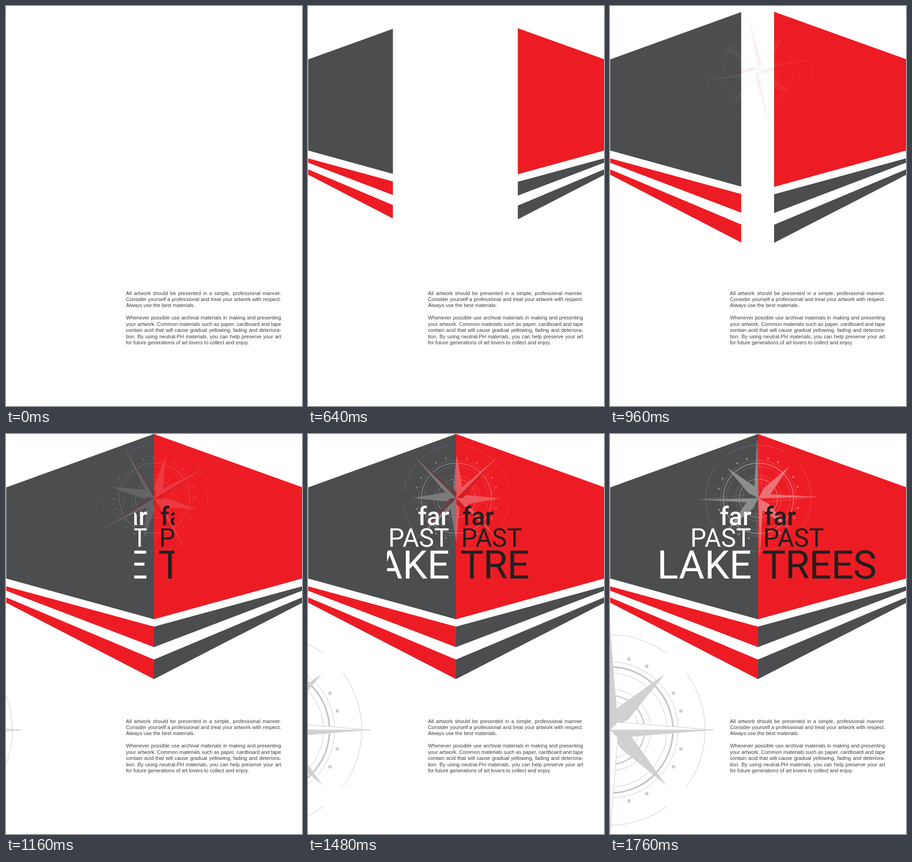
These frames come from a looping animation (644 px wide and 869 px high, 1800 ms). An HTML page:

```html
<!DOCTYPE html>
<html lang="en">
<head>
<meta charset="utf-8">
<title>Poster</title>
<style>
  html, body { margin: 0; width: 100%; height: 100%; overflow: hidden; background: #fff; }
  svg { display: block; width: 644px; height: 869px; }
  .title { font-family: Roboto, "Open Sans", sans-serif; }
  .title .small { font-size: 55px; font-weight: 500; }
  .title .mid { font-size: 55px; }
  .title .big { font-size: 86px; }
  .body { font: 11.13px "Liberation Sans", Arial, sans-serif; fill: #3b3b3c; }
</style>
</head>
<body>
<svg viewBox="0 0 644 869" xmlns="http://www.w3.org/2000/svg">
  <defs>
    <clipPath id="wipeLeft"><rect id="wipeL" y="0" height="869"/></clipPath>
    <clipPath id="wipeRight"><rect id="wipeR" y="0" height="869"/></clipPath>
    <clipPath id="typeLeft"><rect id="typeL" y="140" height="200"/></clipPath>
    <clipPath id="typeRight"><rect id="typeR" y="140" height="200"/></clipPath>
  </defs>
  <g clip-path="url(#wipeLeft)">
    <path fill="#4c4d4f" d="M.5 116L322 0V402.5L.5 314Z"/>
    <path fill="#ed1c24" d="M.5 331L322 418.5V463L.5 340.5ZM.5 355L322 490V532.5L.5 366.5Z"/>
  </g>
  <g clip-path="url(#wipeRight)">
    <path fill="#ed1c24" d="M644 115.5L322 0V402.5L644 314Z"/>
    <path fill="#4c4d4f" d="M644 331L322 418.5V463L644 340.5ZM644 355L322 490V532.5L644 367Z"/>
  </g>
  <g id="rose"></g>
  <g id="bigRose"></g>
  <g class="title">
    <g clip-path="url(#typeLeft)" fill="#fff" text-anchor="end">
      <text class="small" x="307.5" y="197.5">far</text>
      <text class="mid" x="307" y="245">PAST</text>
      <text class="big" x="308.5" y="314">LAKE</text>
    </g>
    <g clip-path="url(#typeRight)" fill="#231f20">
      <text class="small" x="336" y="197.5">far</text>
      <text class="mid" x="333.5" y="245">PAST</text>
      <text class="big" x="331" y="314" letter-spacing="-1">TREES</text>
    </g>
  </g>
  <g id="copy" class="body"></g>
</svg>
<script>
const LOOP = 1800, STEP = 40;
const $ = id => document.getElementById(id);
const set = (id, attrs) => {
  for (const key in attrs) $(id).setAttribute(key, attrs[key]);
};

const polar = (r, deg) => {
  const a = deg * Math.PI / 180;
  return `${(r * Math.sin(a)).toFixed(2)} ${(-r * Math.cos(a)).toFixed(2)}`;
};
const quarters = draw => [0, 90, 180, 270].map(draw).join('');

// Compass rose around the origin; the outer ring is open at the diagonals.
function compass(color, line, paper, shade) {
  const ring = ([r, w]) => `<circle r="${r}" stroke-width="${w}"/>`;
  const rings = [[148, 1], [137, 3.6], [124, 1], [89, 1], [75, 2.6], [62, 1]].map(ring).join('');
  const arcs = quarters(a =>
    `<path d="M${polar(207, a - 36.5)}A207 207 0 0 1 ${polar(207, a + 36.5)}"/>`);
  const dots = quarters(a => [15, 30, 60, 75].map(d => {
    const [x, y] = polar(159.5, a + d).split(' ');
    return `<circle cx="${x}" cy="${y}" r="4"/>`;
  }).join(''));
  const turned = d => quarters(a => `<path transform="rotate(${a})" d="${d}"/>`);
  const lightHalf = 'M0 -226L-17 -17L0 0Z';
  return `<g fill="none" stroke="${line}">${rings}${arcs}</g>
    <g fill="${color}">${dots}${turned('M120 -122L16 -48L0 0L40 -23Z')}</g>
    <g fill="${paper}" stroke="${line}" stroke-width="1">${turned(lightHalf)}</g>
    ${shade ? `<g id="shade" fill="${shade}">${turned(lightHalf)}</g>` : ''}
    <g fill="${color}">${turned('M0 -226L17 -17L0 0Z')}</g>`;
}
$('rose').innerHTML = compass('#e6e7e8', '#e6e7e8', 'none', '#a51e26');
$('bigRose').innerHTML = compass('#d1d1d1', '#c6c6c6', '#fff');

// Lines ending a paragraph stay ragged; the others fill the column.
const COLUMN = 337.5;
[
  'All artwork should be presented in a simple, professional manner.',
  'Consider yourself a professional and treat your artwork with respect.',
  'Always use the best materials.',
  '',
  'Whenever possible use archival materials in making and presenting',
  'your artwork. Common materials such as paper, cardboard and tape',
  'contain acid that will cause gradual yellowing, fading and deteriora-',
  'tion. By using neutral-PH materials, you can help preserve your art',
  'for future generations of art lovers to collect and enjoy.'
].forEach((words, i, lines) => {
  if (!words) return;
  const el = document.createElementNS('http://www.w3.org/2000/svg', 'text');
  el.setAttribute('x', 261);
  el.setAttribute('y', 627.6 + 13.43 * i);
  el.textContent = words;
  $('copy').append(el);
  if (lines[i + 1]) {
    const gaps = words.split(' ').length - 1;
    el.style.wordSpacing = (COLUMN - el.getComputedTextLength()) / gaps + 'px';
  }
});

const clamp = (v, lo, hi) => Math.min(hi, Math.max(lo, v));

function render(t) {
  const leftEdge = clamp(84 + 0.3148 * (t - 320), 0, 322);
  const rightEdge = clamp(556 - 0.311 * (t - 320), 322, 644);
  set('wipeL', { x: 0, width: leftEdge });
  set('wipeR', { x: rightEdge, width: 644 - rightEdge });

  const typedLeft = clamp(279 - 0.334 * (t - 1160), 0, 322);
  const typedRight = clamp(366.5 + 0.375 * (t - 1160), 322, 644);
  set('typeL', { x: typedLeft, width: 322 - typedLeft });
  set('typeR', { x: 322, width: typedRight - 322 });

  const angle = -1.4 - 0.799 * (1760 - t);
  set('rose', {
    transform: `translate(323 139.5) rotate(${angle}) scale(-.557 .557)`,
    opacity: clamp((t - 827) * 0.00045, 0, 0.42)
  });
  set('shade', { opacity: t < 1760 ? 1 : 0 });
  set('bigRose', { transform: `translate(${Math.min(0, 0.3218 * (t - 1760))} 643)`,
    visibility: t < 1050 ? 'hidden' : 'visible' });
}

const start = performance.now();
function frame() {
  const t = (performance.now() - start) % LOOP;
  render(Math.floor(t / STEP) * STEP);
  requestAnimationFrame(frame);
}
render(0);
requestAnimationFrame(frame);
</script>
</body>
</html>
```
